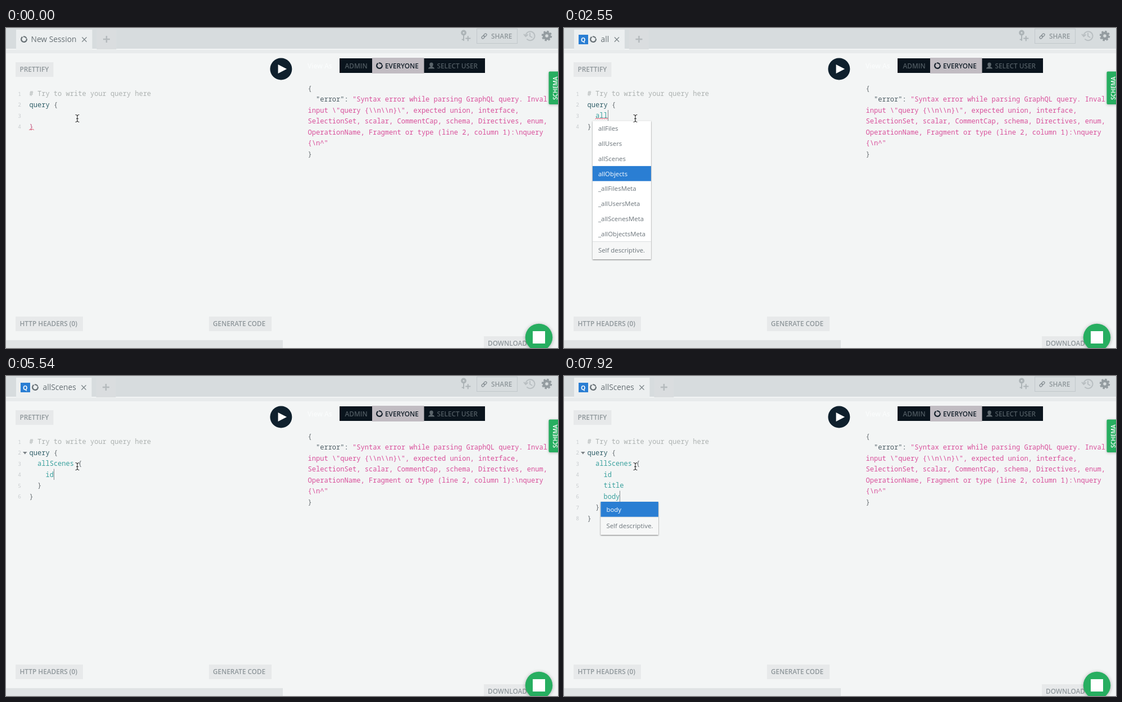
These frames come from a looping animation (983x570 px, 8000 ms). An HTML page:

```html
<!DOCTYPE html>
<html lang="en">
<head>
<meta charset="utf-8">
<title>Query editor</title>
<style>
html, body { margin: 0; width: 100%; height: 100%; overflow: hidden; background: #f3f5f5; }
svg { display: block; }
text { white-space: pre; font: 600 11.8px "Open Sans", sans-serif; }
.code { font: 12.06px "Noto Sans Mono", monospace; }
.num { font: 9.5px "Noto Sans Mono", monospace; fill: #c9cdcf; }
.tab { font-size: 13.8px; font-weight: 400; fill: #666f74; }
.item { font-size: 11.4px; font-weight: 400; fill: #6b747a; }
.btn { fill: #e7e9ea; }
.label { fill: #8f979b; }
.line { fill: none; stroke-linecap: round; }
#menu { filter: drop-shadow(0 1px 1.3px rgba(0,0,0,.5)); }
</style>
</head>
<body>
<svg width="983" height="570" viewBox="0 0 983 570">
  <defs>
    <g id="ring" class="line">
      <path d="M-2.6-4A4.8 4.8 0 1 0 4.7-1" stroke-width="2.3" stroke-linecap="butt"/>
      <path d="M-.5-4.6A4.8 4.8 0 0 1 4-2.4" stroke-width="2"/>
    </g>
  </defs>

  <!-- top bar -->
  <rect width="983" height="38" fill="#d7dcde"/>
  <rect y="37" width="983" height="8" fill="#e8ebec"/>
  <rect y="37" width="983" height="1.5" fill="#f6f8f8"/>
  <g id="tabs"></g>
  <g class="line" stroke="#adb4b7" stroke-width="2">
    <circle cx="815" cy="8.5" r="3.2" stroke-width="3.4"/>
    <path d="M815 12v10M815 20.5h-2.5M819 18.5h7.5M822.7 15v7.5"/>
  </g>
  <rect x="838.5" y="1.5" width="72" height="26" fill="none" stroke="#c2c8cb"/>
  <g class="line" stroke="#8b9398" stroke-width="1.4" transform="translate(851.5 14.5) rotate(-45)">
    <rect x="-5.5" y="-2" width="6" height="4" rx="2"/><rect x="-.5" y="-2" width="6" height="4" rx="2"/>
  </g>
  <text class="label" x="864" y="18.5">SHARE</text>
  <g class="line" stroke="#b9bfc2" stroke-width="2">
    <path d="M925.5 14A8 8 0 1 1 928 20M922.5 11.5l3 3.500 3.500-3M933 9.500v5l3.500 2"/>
  </g>
  <g class="line" stroke="#949ca0">
    <circle cx="963" cy="14" r="5" stroke-width="4.5"/>
    <circle cx="963" cy="14" r="7.8" stroke-width="3" stroke-linecap="butt" stroke-dasharray="3.4 2.726"/>
  </g>

  <!-- left pane -->
  <rect class="btn" x="17" y="61" width="67.5" height="26"/>
  <text class="label" x="24.5" y="78">PRETTIFY</text>
  <rect class="btn" x="17" y="514" width="120" height="26"/>
  <text class="label" x="24.5" y="531">HTTP HEADERS (0)</text>
  <rect class="btn" x="361.5" y="514" width="111.5" height="26"/>
  <text class="label" x="368.5" y="531">GENERATE CODE</text>
  <rect y="556" width="493" height="14" fill="#e0e3e4"/>
  <circle cx="489.8" cy="73" r="19.5" fill="#0f202d"/>
  <path d="M484.5 65l15.500 8-15.500 8z" fill="#fff"/>

  <!-- right pane -->
  <text x="537" y="72" fill="#fafcfc">View As</text>
  <rect x="594" y="54" width="259" height="26" fill="#0a141d"/>
  <rect x="652" y="53" width="92.5" height="28" fill="#c1bcc2"/>
  <text x="603.5" y="71.5" fill="#505b62">ADMIN</text>
  <use href="#ring" x="665" y="67" stroke="#14202a"/>
  <text x="675" y="71.5" fill="#14202a">EVERYONE</text>
  <path d="M752 72.500q0-2.500 4-3.500-2-2-1.800-4.500.3-3 3.300-3t3.300 3q.2 2.500-1.800 4.500 4 1 4 3.500z" fill="#5b656b"/>
  <text x="767.5" y="71.5" fill="#505b62">SELECT USER</text>
  <g id="result"></g>
  <rect x="966.5" y="77.5" width="20" height="58.5" rx="2" fill="#27ae60" style="filter:drop-shadow(0 1px 2px rgba(0,0,0,.25))"/>
  <text transform="translate(982 128) rotate(-90)" fill="#fff" style="font-size:10.2px">SCHEMA</text>
  <rect class="btn" x="851" y="549" width="100" height="26"/>
  <text class="label" x="858" y="566">DOWNLOAD</text>
  <circle cx="949" cy="551" r="24.3" fill="#27ae60" style="filter:drop-shadow(0 1px 3px rgba(0,0,0,.3))"/>
  <rect x="938" y="540" width="22" height="22" fill="#fff"/>

  <g id="editor"></g>
  <path class="line" stroke="#222" d="M124 154.500q3 0 3 2 0-2 3-2M127 156v10M124 167.500q3 0 3-2 0 2 3 2M125.500 161.500h3"/>
</svg>
<script>
const LOOP = 8000, CHAR = 7.235, LEFT = 41.5, ROW = 19.5;
const $ = id => document.getElementById(id);
const rect = (x, y, w, h, fill) =>
  `<rect x="${x}" y="${y}" width="${w}" height="${h}" fill="${fill}"/>`;
const text = (cls, x, y, body, extra = '') =>
  `<text class="${cls}" x="${x}" y="${y}" ${extra}>${body}</text>`;
const span = (fill, body) => `<tspan fill="${fill}">${body}</tspan>`;
const rowY = row => 117 + row * ROW;

const kinds = ['Files', 'Users', 'Scenes', 'Objects'];
const fields = [...kinds.map(k => 'all' + k), ...kinds.map(k => `_all${k}Meta`)];
const scene = inner => `  allScenes {\n${inner}\n  }`;

// Each step changes only what it names; "|" is the caret.
const steps = [
  { t: 0, body: '', tab: '', menu: null, sel: 0, lint: 'end', fold: false },
  { t: 150, body: '|' },
  { t: 630, body: '  |' },
  { t: 1070, body: '  a|', menu: fields },
  { t: 1220, body: '  al|' },
  { t: 1370, body: '  all|' },
  { t: 1810, tab: 'all' },
  { t: 1960, lint: 'word' },
  { t: 2260, sel: 1 },
  { t: 2400, sel: 2 },
  { t: 2550, sel: 3 },
  { t: 2850, sel: 2 },
  { t: 3300, body: '  allScenes|', menu: null, sel: 0, lint: '' },
  { t: 3750, body: '  allScenes |', tab: 'allScenes' },
  { t: 4190, body: '  allScenes {|}' },
  { t: 4340, body: scene('    |') },
  { t: 4790, body: scene('    i|'), tab: '', menu: ['id'] },
  { t: 4940, body: scene('    id|') },
  { t: 5540, tab: 'allScenes', menu: null, fold: true },
  { t: 5980, body: scene('    id\n    |') },
  { t: 6280, body: scene('    id\n    t|'), menu: ['title', 'objects'] },
  { t: 6430, body: scene('    id\n    ti|'), menu: ['title'] },
  { t: 6580, body: scene('    id\n    titl|') },
  { t: 6730, body: scene('    id\n    title|') },
  { t: 6880, menu: null },
  { t: 7330, body: scene('    id\n    title\n    |') },
  { t: 7630, body: scene('    id\n    title\n    b|'), menu: ['body', 'objects'] },
  { t: 7780, body: scene('    id\n    title\n    bo|'), menu: ['body'] },
  { t: 7920, body: scene('    id\n    title\n    body|') },
];
for (let i = 1; i < steps.length; i++) steps[i] = { ...steps[i - 1], ...steps[i] };

function drawTabs(name) {
  const close = { '': 139.5, all: 94, allScenes: 138.5 }[name];
  const right = close + 14, plus = right + 25.5;
  const badge = name
    ? rect(26, 12, 17, 17, '#2a7ed3') + text('', 30, 24.5, 'Q', 'fill="#fff" style="font-size:10.5px;font-weight:700"')
    : '';
  $('tabs').innerHTML =
    rect(18, 3, right - 18, 35, '#eceff0') + rect(right + 8, 3, 35, 35, '#dadddf') + badge +
    `<use href="#ring" x="${name ? 52 : 32}" y="20" stroke="#666f74"/>` +
    text('tab', name ? 65.5 : 44.5, 25, name || 'New Session') +
    `<path class="line" stroke="#7d868a" stroke-width="1.3" d="M${close - 3.7} 16.800l7.400 7.400m0-7.400l-7.400 7.400"/>` +
    `<path stroke="#b5babd" stroke-width="2.5" d="M${plus - 6} 20h12m-6-6v12"/>`;
}

function paint(line) {
  if (line[0] === '#') return span('#adb2b1', line);
  return line.replace(/\w+|[{}]/g, w =>
    span(w === 'query' ? '#32606a' : /\w/.test(w) ? '#3aa19e' : '#666d71', w));
}

function squiggle(x, y, width) {
  let d = `M${x} ${y}`;
  for (let i = 0; i < width / 2; i++) d += `l2 ${i % 2 ? 1.5 : -1.5}`;
  return `<path class="line" stroke="#e0455f" d="${d}"/>`;
}

function drawMenu({ menu, sel }, x, y) {
  const step = 26.8, h = menu.length * step, w = menu === fields ? 104 : 102.5;
  const items = menu.map((name, i) =>
    (i === sel ? rect(x, y + i * step, w, step, '#2a7ed3') : '') +
    text('item', x + 10, y + i * step + 17.6, name, i === sel ? 'style="fill:#fff"' : '')).join('');
  return `<g id="menu">${rect(x, y, w, h + 32, '#fff')}${rect(x, y + h, w, 32, '#f6f7f7')}` +
    `${rect(x, y + h, w, 1, '#dcdfe0')}${items}${text('item', x + 10, y + h + 20.5, 'Self descriptive.')}</g>`;
}

function drawEditor(s) {
  const lines = `# Try to write your query here\nquery {\n${s.body}\n}`.split('\n');
  let out = '', over = '';
  lines.forEach((raw, row) => {
    const y = rowY(row), line = raw.replace('|', ''), col = raw.indexOf('|');
    const broken = s.lint === 'end' && line === '}';
    out += text('num', 21.3, y + 3.5, row + 1) +
      text('code', LEFT, y + 4.3, broken ? span('#c2557f', line) : paint(line));
    if (broken) out += squiggle(41.5, y + 6, 8);
    if (col < 0) return;
    const word = line.search(/\w/);
    if (s.lint === 'word') out += squiggle(LEFT + word * CHAR, y + 6, 22);
    out += rect(Math.floor(41.9 + col * CHAR), y - 10, 1, ROW, '#858b8e');
    if (s.menu) over = drawMenu(s, LEFT + word * CHAR - 5, y + 9.5);
  });
  if (s.fold) out += '<path d="M30 135h7.500l-3.750 4.500z" fill="#7b8286"/>';
  $('editor').innerHTML = out + over;
}

const error = String.raw`"Syntax error while parsing GraphQL query. Inval
input \"query {\\n\\n}\", expected union, interface,
SelectionSet, scalar, CommentCap, schema, Directives, enum,
OperationName, Fragment or type (line 2, column 1):\nquery
{\n^"`.split('\n').map(l => span('#d9509b', l));
error[0] = span('#4d5d64', '  "error": ') + error[0];
$('result').innerHTML = [span('#666d71', '{'), ...error, span('#666d71', '}')]
  .map((l, i) => text('code', 537.5, 111.8 + i * ROW, l)).join('');

let shown;
function frame(now) {
  const t = now % LOOP;
  const s = steps.findLast(step => step.t <= t) || steps[0];
  if (s !== shown) {
    drawTabs(s.tab);
    drawEditor(s);
    shown = s;
  }
  requestAnimationFrame(frame);
}
frame(0);
</script>
</body>
</html>
```
